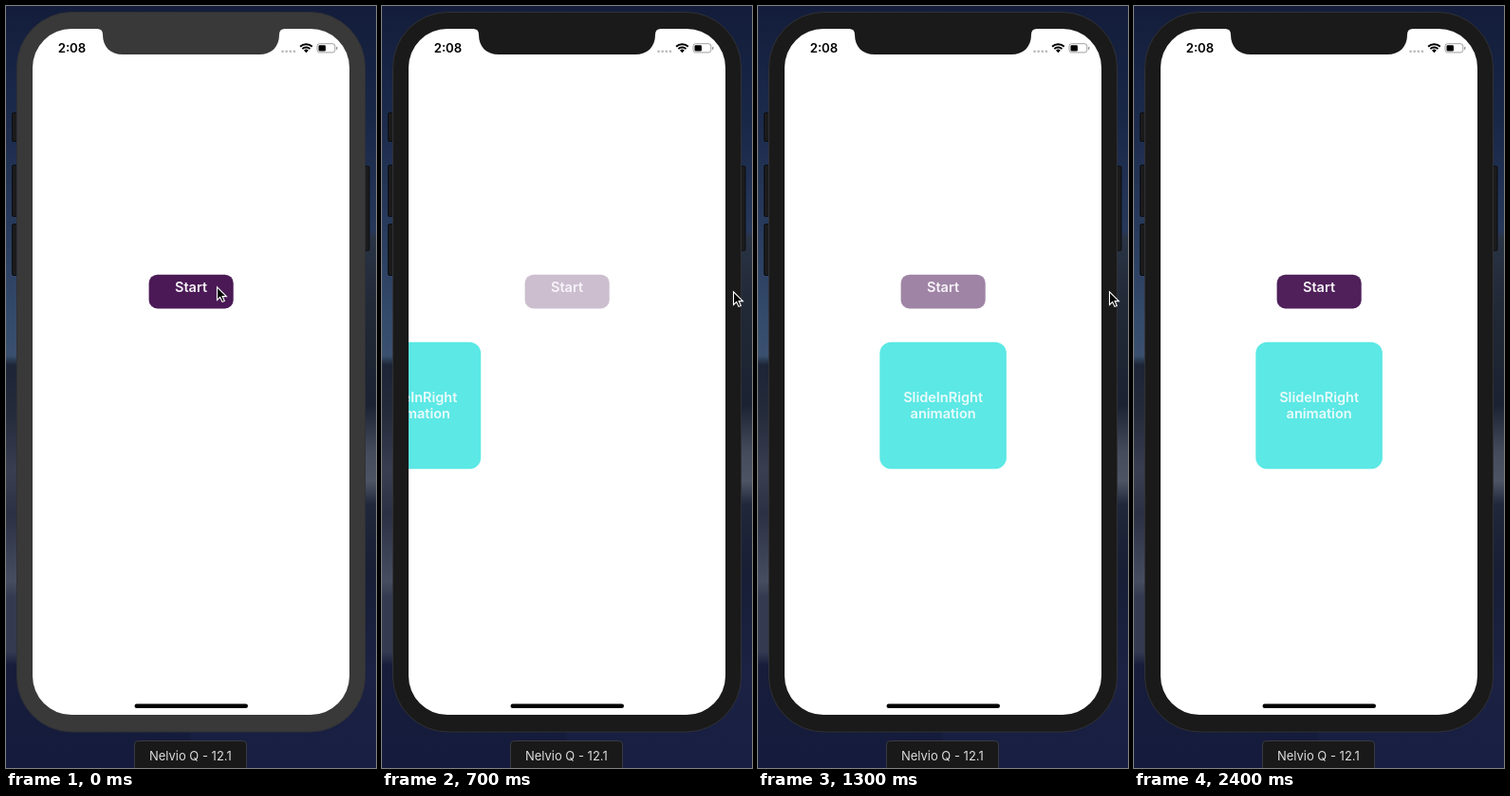
Animation, 390 px wide and 802 px high, one loop 2500 ms. Source, as an HTML page with a canvas:

```html
<!DOCTYPE html>
<html lang="en">
<head>
<meta charset="utf-8">
<title>Slide in right</title>
<style>
html, body { margin: 0; width: 100%; height: 100%; overflow: hidden; background: #161c3c; }
canvas { display: block; width: 390px; height: 802px; }
</style>
</head>
<body>
<canvas id="stage" width="390" height="802"></canvas>
<script>
const ctx = document.getElementById('stage').getContext('2d');
const LOOP = 2500, STEP = 100;
const FONT = 'Inter, Roboto, "Liberation Sans", sans-serif';

const clamp = v => Math.max(0, Math.min(1, v));
const smooth = u => u * u * (3 - 2 * u);
const inOutQuad = u => u < 0.5 ? 2 * u * u : 1 - 2 * (1 - u) * (1 - u);

function box(x, y, w, h, r, fill, line) {
  ctx.beginPath();
  ctx.roundRect(x, y, w, h, r);
  if (fill) { ctx.fillStyle = fill; ctx.fill(); }
  if (line) { ctx.strokeStyle = line; ctx.lineWidth = 1; ctx.stroke(); }
}

function label(str, x, y, size, weight, color, align = 'center') {
  ctx.font = `${weight} ${size}px ${FONT}`;
  ctx.textAlign = align;
  ctx.fillStyle = color;
  ctx.fillText(str, x, y);
}

function strip(x, w, stops) {
  const g = ctx.createLinearGradient(0, 0, 0, 802);
  for (const [y, c] of stops) g.addColorStop(y / 802, c);
  ctx.fillStyle = g;
  ctx.fillRect(x, 0, w, 802);
}

function wallpaper() {
  strip(0, 195, [
    [0, '#131d3b'], [110, '#1b294a'], [220, '#27395a'], [330, '#344b6b'],
    [368, '#3a506e'], [378, '#1d2536'], [430, '#242b3b'], [490, '#393f50'],
    [535, '#2b3143'], [605, '#474d61'], [622, '#343b50'], [680, '#343a50'],
    [694, '#171d3a'], [802, '#151b3d']
  ]);
  strip(195, 195, [
    [0, '#131d3b'], [120, '#192747'], [236, '#25375a'], [244, '#293343'],
    [330, '#202735'], [420, '#1b2231'], [470, '#454c5c'], [500, '#4d5464'],
    [525, '#20273a'], [600, '#171e35'], [700, '#1b2243'], [802, '#181e42']
  ]);
}

function phone(bezel) {
  for (const [y, h] of [[112, 31], [167, 55], [229, 55]])
    box(6.5, y + 0.5, 8, h - 1, 1.5, '#1b1b1c', '#0d0e12');
  box(375.5, 168.5, 7.5, 89, 1.5, '#1b1b1c', '#0d0e12');
  box(11.5, 6.5, 367, 757.5, 58, bezel, '#303136');
  box(28, 24, 334, 722, 41, '#fff');
}

function notch(bezel) {
  ctx.fillStyle = bezel;
  ctx.beginPath();
  ctx.moveTo(96, 23);
  ctx.lineTo(96, 24);
  ctx.quadraticCurveTo(102, 24, 102, 30);
  ctx.bezierCurveTo(102, 43, 110, 51, 123, 51);
  ctx.lineTo(267, 51);
  ctx.bezierCurveTo(280, 51, 288, 43, 288, 30);
  ctx.quadraticCurveTo(288, 24, 294, 24);
  ctx.lineTo(294, 23);
  ctx.fill();
}

function statusBar() {
  label('2:08', 54.7, 49, 13.2, 600, '#000', 'left');
  ctx.fillStyle = '#bcbcbc';
  for (let i = 0; i < 4; i++) {
    ctx.beginPath();
    ctx.arc(291.6 + i * 4.1, 47.8, 1.4, 0, 7);
    ctx.fill();
  }
  // wifi fan
  const a = -Math.PI / 2, cx = 316.4, cy = 49.2;
  ctx.strokeStyle = ctx.fillStyle = '#000';
  ctx.lineWidth = 2;
  for (const r of [9, 5.7]) {
    ctx.beginPath();
    ctx.arc(cx, cy, r, a - 0.78, a + 0.78);
    ctx.stroke();
  }
  ctx.beginPath();
  ctx.moveTo(cx, cy);
  ctx.arc(cx, cy, 3.4, a - 0.78, a + 0.78);
  ctx.fill();
  // battery
  box(328, 39.7, 18.8, 9.2, 2.6, null, '#a0a0a0');
  box(329.5, 41.2, 7.4, 6.3, 1.2, '#000');
  box(348, 42.7, 1.3, 3.4, 0.7, '#999');
}

function cursor(x, y) {
  ctx.save();
  ctx.translate(x, y);
  ctx.beginPath();
  ctx.moveTo(0.5, 0.8);
  for (const [px, py] of [[0.5, 14.4], [3.7, 11.5], [6, 16.4], [8.3, 15.4], [6.1, 10.6], [10.4, 10.6]])
    ctx.lineTo(px, py);
  ctx.closePath();
  ctx.fillStyle = '#000';
  ctx.fill();
  ctx.strokeStyle = '#fff';
  ctx.lineWidth = 1.1;
  ctx.stroke();
  ctx.restore();
}

function buttonAlpha(t) {
  if (t < 100) return 1;
  if (t < 200) return 0.6;
  return 0.2 + 0.8 * inOutQuad(clamp((t - 92) / 2650));
}

function cardLeft(t) {
  if (t < 500) return -133 + 44 * Math.pow(clamp((t - 200) / 300), 1.4);
  return -112 + 240.3 * inOutQuad(clamp((t - 275) / 1025));
}

function draw(t) {
  const bezel = t < 100 ? '#393939' : '#1a1a1a';
  wallpaper();
  phone(bezel);

  ctx.save();
  ctx.beginPath();
  ctx.roundRect(28, 24, 334, 722, 41);
  ctx.clip();

  ctx.globalAlpha = buttonAlpha(t);
  box(150.6, 282.7, 89.1, 35.7, 9, '#4b1a56');
  ctx.globalAlpha = 1;
  label('Start', 195, 301, 14.5, 600, '#f8f4f9');

  if (t > 200) {
    const x = cardLeft(t);
    box(x, 353.8, 133.6, 133.5, 12, '#5ce8e5');
    label('SlideInRight', x + 66.8, 417, 14.5, 600, '#e9fbfb');
    label('animation', x + 66.8, 434, 14.5, 600, '#e9fbfb');
  }
  ctx.restore();

  notch(bezel);
  statusBar();
  box(135.5, 734.5, 119.5, 4.6, 2.3, '#000');
  box(135.5, 773.5, 118, 40, 4, '#191919', '#3b3b40');
  label('Nelvio Q - 12.1', 194.3, 794, 13, 400, '#dcdcdc');

  if (t < 2200) {
    const k = smooth(clamp((t - 180) / 344));
    cursor(222 + 148 * k, 295 + 5 * k);
  }
}

function tick(now) {
  draw(Math.floor((now % LOOP) / STEP) * STEP);
  requestAnimationFrame(tick);
}
draw(0);
const start = performance.now();
requestAnimationFrame(function run(now) {
  tickAt(Math.max(0, now - start));
  requestAnimationFrame(run);
});
function tickAt(ms) {
  draw(Math.floor((ms % LOOP) / STEP) * STEP);
}
</script>
</body>
</html>
```
